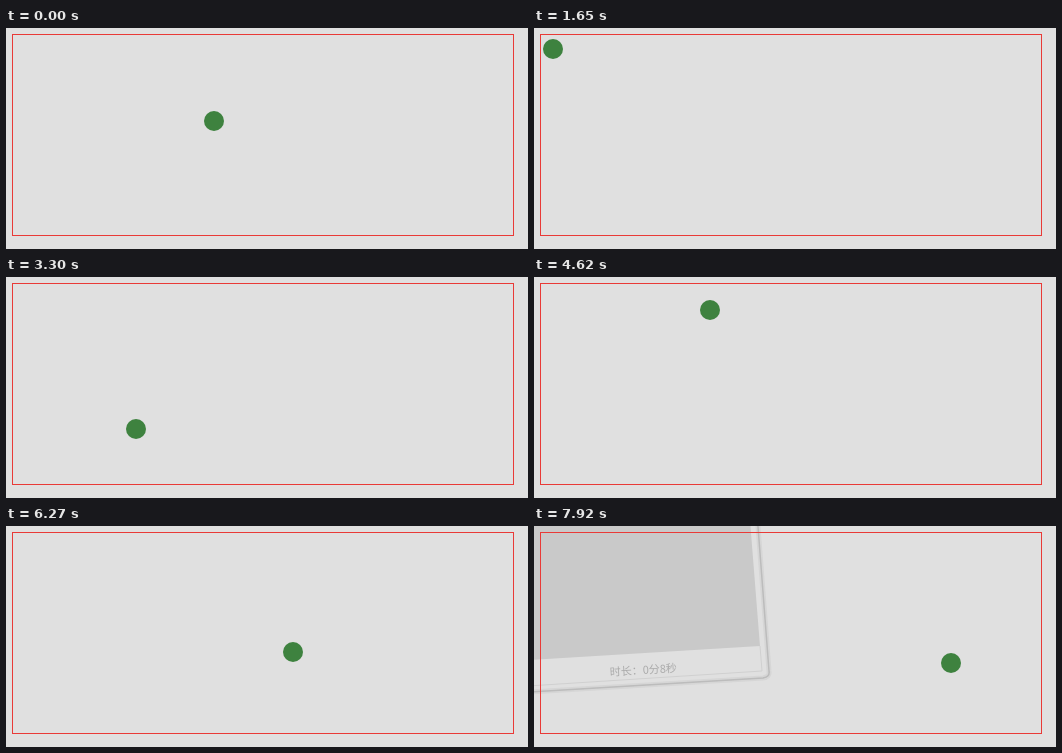
An HTML page for the animation above (8000 ms loop, 522 px wide and 221 px high).

```html
<!DOCTYPE html>
<html lang="zh">
<head>
<meta charset="utf-8">
<style>
  html, body { margin: 0; width: 100%; height: 100%; overflow: hidden; background: #e0e0e0; }
  svg { display: block; }
  #card { opacity: 0; }
  text { font: 300 11px "Noto Sans CJK SC", "Noto Sans CJK", sans-serif; fill: #aaa; }
</style>
</head>
<body>
<svg width="522" height="221" viewBox="0 0 522 221">
  <defs>
    <path id="edge" d="M223.500 -6 L235 145 Q236 151 229 152 L-6 166"/>
  </defs>
  <g id="card">
    <g fill="none">
      <use href="#edge" stroke="#d6d6d6" stroke-width="5"/>
      <use href="#edge" stroke="#bcbcbc" stroke-width="1.500"/>
    </g>
    <path d="M-6 -6 H216 L226 120 L-6 134 Z" fill="#c9c9c9"/>
    <path d="M226 120 L228 145 L-6 160" fill="none" stroke="#d0d0d0"/>
    <text x="76" y="150" transform="rotate(-3.500 76 150)">时长：0分8秒</text>
  </g>
  <rect x="6.500" y="6.500" width="501" height="201" fill="none" stroke="#e93a37"/>
  <circle id="ball" cx="10" cy="10" r="10" fill="#3e823f"/>
</svg>
<script>
  const LOOP = 8000, STEP = 330;
  const LAST = Math.floor(LOOP / STEP);

  // The ball bounces along six legs; the long way home takes the last quarter.
  const CYCLE = 9600, PHASE = 8000, MARGIN = 7, DROP = 180;
  const legTimes = [0, .15, .3, .45, .6, .75, 1];
  const legX = [0, 100, 150, 250, 300, 450, 0];
  const legY = i => i % 2 * DROP;

  // cubic-bezier(.25, .1, .25, 1), the CSS "ease" curve
  function ease(t) {
    let lo = 0, hi = 1, u;
    for (let i = 0; i < 24; i++) {
      u = (lo + hi) / 2;
      if (.75 * u * (1 - u) + u ** 3 < t) lo = u; else hi = u;
    }
    return .3 * u * (1 - u) ** 2 + 3 * u * u * (1 - u) + u ** 3;
  }

  function position(ms) {
    const t = (ms + PHASE) % CYCLE / CYCLE;
    const i = legTimes.findIndex(end => end > t) - 1;
    const p = ease((t - legTimes[i]) / (legTimes[i + 1] - legTimes[i]));
    const between = (a, b) => Math.round(MARGIN + a + (b - a) * p);
    return [between(legX[i], legX[i + 1]), between(legY(i), legY(i + 1))];
  }

  const play = (id, frames) =>
    document.getElementById(id).animate(frames, { duration: LOOP, iterations: Infinity });

  const moves = Array.from({ length: LAST + 1 }, (_, i) => {
    const [x, y] = position(i * STEP);
    return { offset: i * STEP / LOOP, transform: `translate(${x}px, ${y}px)`, easing: "step-end" };
  });
  play("ball", [...moves, { ...moves.at(-1), offset: 1 }]);

  play("card", [
    { offset: 0, opacity: 0, easing: "step-end" },
    { offset: LAST * STEP / LOOP, opacity: 1 },
    { offset: 1, opacity: 1 }
  ]);
</script>
</body>
</html>
```
